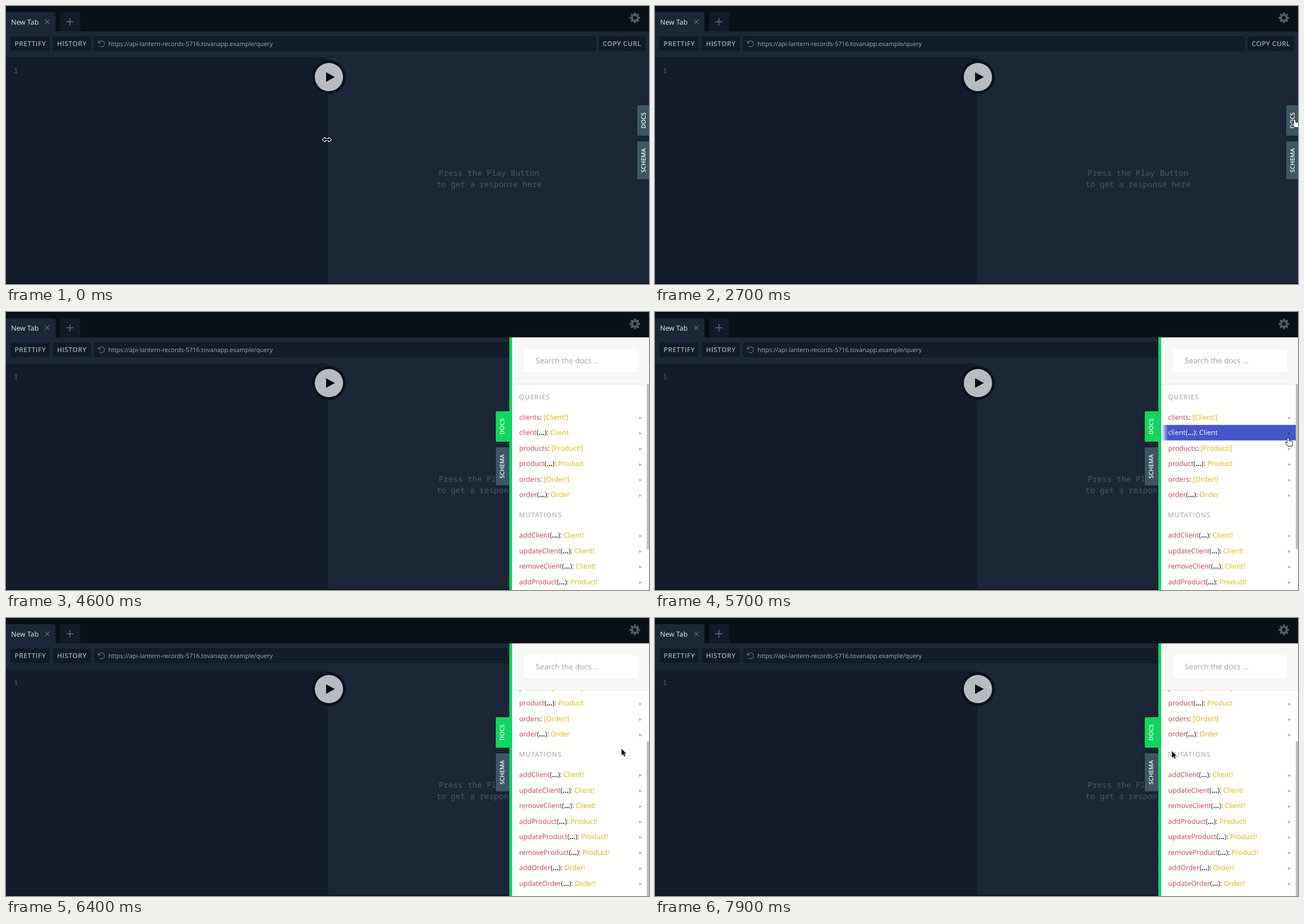
An HTML page with a canvas that plays this animation: 1137 by 493 pixels, repeating every 8 s.

```html
<!DOCTYPE html>
<html lang="en">
<head>
<meta charset="utf-8">
<title>API console</title>
<style>
  html, body { margin: 0; width: 100%; height: 100%; overflow: hidden; background: #0a1018; }
  canvas { display: block; width: 1137px; height: 493px; }
</style>
</head>
<body>
<canvas id="stage" width="1137" height="493"></canvas>
<script>
const W = 1137, H = 493, LOOP = 8000, STEP = 100;
const SANS = '"Open Sans", "Noto Sans", sans-serif';
const MONO = '"Noto Sans Mono", "DejaVu Sans Mono", monospace';
const ctx = document.getElementById('stage').getContext('2d');

const PANEL = 895, LIST_TOP = 128, ROW_H = 27.5, BAR_X = 1133;
const OPEN_AT = 3200;
const SCROLL = { from: 5900, to: 6400, dist: 118 };

// The pointer rests between moves.
const HOME = { x: 567.5, y: 237 };
const MOVES = [
  { from: 500, to: 1400, x: 779, y: 241 },
  { from: 1400, to: 2300, x: 1129, y: 200 },
  { from: 2600, to: 2700, x: 1131, y: 201 },
  { from: 3300, to: 3600, x: 1118, y: 213 },
  { from: 3800, to: 4500, x: 1150, y: 222 },
  { from: 5500, to: 5900, x: 1089, y: 225 },
  { from: 6300, to: 6500, x: 1087, y: 238 },
  { from: 6600, to: 7100, x: 1101, y: 273 },
  { from: 7200, to: 7900, x: 913.5, y: 235.5 }
];

const TYPES = ['Client', 'Product', 'Order'];
const queries = TYPES.flatMap(type => {
  const name = type.toLowerCase();
  return [{ name: name + 's', type: `[${type}!]` }, { name, type, args: true }];
});
const mutations = TYPES.flatMap(type =>
  ['add', 'update', 'remove'].map(verb => ({ name: verb + type, type: type + '!', args: true }))
).slice(0, 8);
const stack = (list, top) => list.map((row, i) => ({ ...row, top: top + i * ROW_H }));
const rows = [...stack(queries, 172.8), ...stack(mutations, 382)];

const progress = (t, { from, to }) => Math.min(1, Math.max(0, (t - from) / (to - from)));
const smooth = p => p * p * (3 - 2 * p);

function pointerAt(t) {
  let { x, y } = HOME;
  for (const move of MOVES) {
    const p = progress(t, move);
    x += (move.x - x) * p;
    y += (move.y - y) * p;
  }
  return { x, y };
}

function box(x, y, w, h, fill, radius = 0, stroke) {
  ctx.beginPath();
  ctx.roundRect(x, y, w, h, radius);
  ctx.fillStyle = fill;
  ctx.fill();
  if (stroke) {
    ctx.strokeStyle = stroke;
    ctx.lineWidth = 1;
    ctx.stroke();
  }
}

function shadowBox(blur, ...args) {
  ctx.save();
  ctx.shadowColor = 'rgba(0, 0, 0, 0.35)';
  ctx.shadowBlur = blur;
  box(...args);
  ctx.restore();
}

// Returns the x where the text ends.
function text(str, x, y, size, color, { weight = 400, gap = 0, family = SANS, align = 'left' } = {}) {
  ctx.font = `${weight} ${size}px ${family}`;
  ctx.letterSpacing = gap + 'px';
  ctx.textAlign = align;
  ctx.fillStyle = color;
  ctx.fillText(str, x, y);
  return x + ctx.measureText(str).width;
}

function poly(points, fill, stroke, width = 1) {
  ctx.beginPath();
  points.forEach(([x, y]) => ctx.lineTo(x, y));
  ctx.closePath();
  ctx.lineJoin = 'round';
  if (stroke) {
    ctx.strokeStyle = stroke;
    ctx.lineWidth = width;
    ctx.stroke();
  }
  ctx.fillStyle = fill;
  ctx.fill();
}

function disc(x, y, r, fill) {
  ctx.beginPath();
  ctx.arc(x, y, r, 0, Math.PI * 2);
  ctx.fillStyle = fill;
  ctx.fill();
}

// Two crossing strokes: upright plus, or turned into a close mark.
function cross(x, y, r, width, color, turn = 0) {
  ctx.save();
  ctx.translate(x, y);
  ctx.rotate(turn);
  ctx.fillStyle = color;
  ctx.fillRect(-r, -width / 2, 2 * r, width);
  ctx.fillRect(-width / 2, -r, width, 2 * r);
  ctx.restore();
}

function gear(x, y) {
  ctx.save();
  ctx.translate(x, y);
  disc(0, 0, 7, '#545b65');
  for (let i = 0; i < 8; i++) {
    box(-1.8, -9.4, 3.6, 4, '#545b65', 0.6);
    ctx.rotate(Math.PI / 4);
  }
  disc(0, 0, 3.2, '#0a1018');
  ctx.restore();
}

function reload(x, y) {
  ctx.strokeStyle = '#626b77';
  ctx.lineWidth = 1.2;
  ctx.beginPath();
  ctx.arc(x, y, 5.2, Math.PI * 1.1, Math.PI * 2.75);
  ctx.moveTo(x - 6, y - 5.5);
  ctx.lineTo(x - 5.5, y - 1.2);
  ctx.lineTo(x - 1.3, y - 1.7);
  ctx.stroke();
}

function button(label, x, w) {
  box(x, 54, w, 26, '#101a28', 2);
  text(label, x + 7.2, 71, 11.8, '#a3a8af', { weight: 600, gap: 0.46 });
}

function drawConsole() {
  box(0, 0, W, 45, '#0a1018');
  box(0, 45, W, 46, '#1b2739');
  box(0, 11, 87.5, 34, '#1b2739', [2, 2, 0, 0]);
  text('New Tab', 9, 32.6, 12.25, '#e8eaed');
  cross(73, 28, 5.6, 1.2, '#5d6671', Math.PI / 4);
  box(96, 11, 35.5, 34, '#121b29', [2, 2, 0, 0]);
  cross(113, 28, 6.5, 2, '#515a66');
  gear(1112, 21);

  button('PRETTIFY', 8, 69);
  button('HISTORY', 83, 67);
  box(156.5, 54.5, 886, 25, '#121c2b', 3, '#0c131f');
  reload(169, 67);
  text('https://api-lantern-records-5716.tovanapp.example/query', 181, 71, 10.8, '#a5abb3');
  button('COPY CURL', 1048, 83);

  box(0, 91, W, 400, '#1b2738');
  box(0, 91, 569.5, 400, '#121c2b');
  box(0, 491, W, 2, '#0e1522');
  text('1', 14, 119, 12.25, '#5c6671', { family: MONO });

  const hint = { family: MONO, gap: 0.07, align: 'center' };
  text('Press the Play Button', 854.3, 301, 14, '#4c5764', hint);
  text('to get a response here', 854.3, 321, 14, '#4c5764', hint);

  disc(571, 126, 30, '#0b121d');
  disc(571, 126, 25, '#b8bcc1');
  poly([[566, 117.5], [566, 134.5], [581.5, 126]], '#080c12');
}

function sideTab(label, x, y, h, fill) {
  shadowBox(4, x, y, 24, h, fill, [2, 0, 0, 2]);
  ctx.save();
  ctx.translate(x + 15.3, y + h / 2);
  ctx.rotate(-Math.PI / 2);
  text(label, 0, 0, 10.6, '#f4f6f7', { weight: 600, align: 'center' });
  ctx.restore();
}

function drawTabs(open) {
  const x = open ? 866 : 1116;
  sideTab('DOCS', x, 176, 54, open ? '#0fd65f' : '#3d5564');
  sideTab('SCHEMA', x, 240, 67.5, '#3d5564');
}

function drawRow(row, y, hot) {
  if (hot) {
    const g = ctx.createLinearGradient(896, 0, 907, 0);
    g.addColorStop(0, '#f4f4fd');
    g.addColorStop(1, '#4456cc');
    box(896, y, BAR_X - 896, ROW_H, g);
  }
  const ink = c => hot ? '#f6f7fe' : c;
  let x = 907.4;
  const put = (str, color, weight) => {
    x = text(str, x, Math.round(y + 18), 12.25, ink(color), { weight });
  };
  put(row.name, '#c63d50');
  if (row.args) {
    put('(', '#222');
    put('...', '#222', 700);
    put(')', '#222');
  }
  put(': ', '#222');
  put(row.type, '#d9b010');
  const mid = y + 15.3;
  poly([[1119.5, mid - 2.7], [1119.5, mid + 2.7], [1124.5, mid]], hot ? '#2d3b94' : '#b4b4b4');
}

function drawDocs(scroll, hot, barHot) {
  box(PANEL - 5, 45, 5, H - 45, '#0fd65f');
  box(PANEL, 45, W - PANEL, H - 45, '#fffffe');
  box(PANEL, 45, W - PANEL, 83, '#f8f7f6');
  box(PANEL, 127.5, W - PANEL, 1, '#e2e2e2');
  box(914.5, 66.5, 204, 41.5, '#ebebea', 2);
  box(915, 66, 203, 41, '#fffffe', 2);
  text('Search the docs ...', 936.8, 91, 13.4, '#a0a0a0');

  ctx.save();
  ctx.beginPath();
  ctx.rect(PANEL, LIST_TOP, W - PANEL, H - LIST_TOP);
  ctx.clip();
  const heading = (str, y) =>
    text(str, 907.1, Math.round(y - scroll), 11.8, '#b3b3b3', { weight: 600, gap: 0.88 });
  heading('QUERIES', 155);
  heading('MUTATIONS', 364);
  rows.forEach(row => drawRow(row, row.top - scroll, row === hot));
  box(BAR_X, LIST_TOP + scroll * 0.765, 4, 293, barHot ? '#a6a6a6' : '#c0c0c0', 1.5);
  ctx.restore();
}

const CURSORS = {
  resize() {
    const half = [[-7.6, 0], [-3.4, -3.4], [-3.4, -1.2]];
    const upper = [...half, ...half.map(([x, y]) => [-x, y]).reverse()];
    const lower = half.slice(1).map(([x, y]) => [x, -y]);
    poly([...upper, ...lower.map(([x, y]) => [-x, y]), ...lower.reverse()], '#0a0a0a', '#fff', 2);
  },
  arrow() {
    poly([[0.5, 0.5], [0.5, 12.3], [3.2, 9.8], [5, 14], [7, 13.1], [5.2, 9], [8.6, 8.7]],
      '#111', '#f4f4f4', 1.6);
  },
  hand() {
    ctx.beginPath();
    for (let i = 0; i < 4; i++) {
      const top = i ? 4.6 + i * 0.5 : 0.3;
      ctx.roundRect(-1.2 + i * 2.1, top, 2.4, 12 - top, 1.1);
    }
    ctx.roundRect(-1.2, 7, 8.7, 7, [0, 0, 2.5, 2.5]);
    ctx.moveTo(-4.3, 7.6);
    ctx.lineTo(-1, 9);
    ctx.lineTo(0, 14);
    ctx.closePath();
    ctx.lineJoin = 'round';
    ctx.lineWidth = 1.8;
    ctx.strokeStyle = '#161616';
    ctx.fillStyle = '#fcfcfc';
    ctx.stroke();
    ctx.fill();
  }
};

function cursorKind(open, x, hot) {
  if (open) return hot ? 'hand' : 'arrow';
  return x < 576 ? 'resize' : x < 1116 ? 'arrow' : 'hand';
}

// The highlight is only refreshed once scrolling has settled.
function hoveredRow(t, { x, y }) {
  if (x >= BAR_X) return null;
  const listY = y + (t < SCROLL.to ? 0 : SCROLL.dist);
  return rows.find(row => listY >= row.top && listY < row.top + ROW_H);
}

function draw(t) {
  const pointer = pointerAt(t);
  const open = t >= OPEN_AT;
  const hot = open && hoveredRow(t, pointer);
  drawConsole();
  if (open) shadowBox(5, PANEL - 5, 45, W, H, '#0fd65f');
  drawTabs(open);
  if (open) drawDocs(SCROLL.dist * smooth(progress(t, SCROLL)), hot, pointer.x >= BAR_X && pointer.x < W);
  ctx.save();
  ctx.translate(pointer.x, pointer.y);
  CURSORS[cursorKind(open, pointer.x, hot)]();
  ctx.restore();
}

ctx.textRendering = 'geometricPrecision';
const start = performance.now();
function tick() {
  const t = (performance.now() - start) % LOOP;
  draw(Math.floor(t / STEP) * STEP);
  requestAnimationFrame(tick);
}
tick();
</script>
</body>
</html>
```
